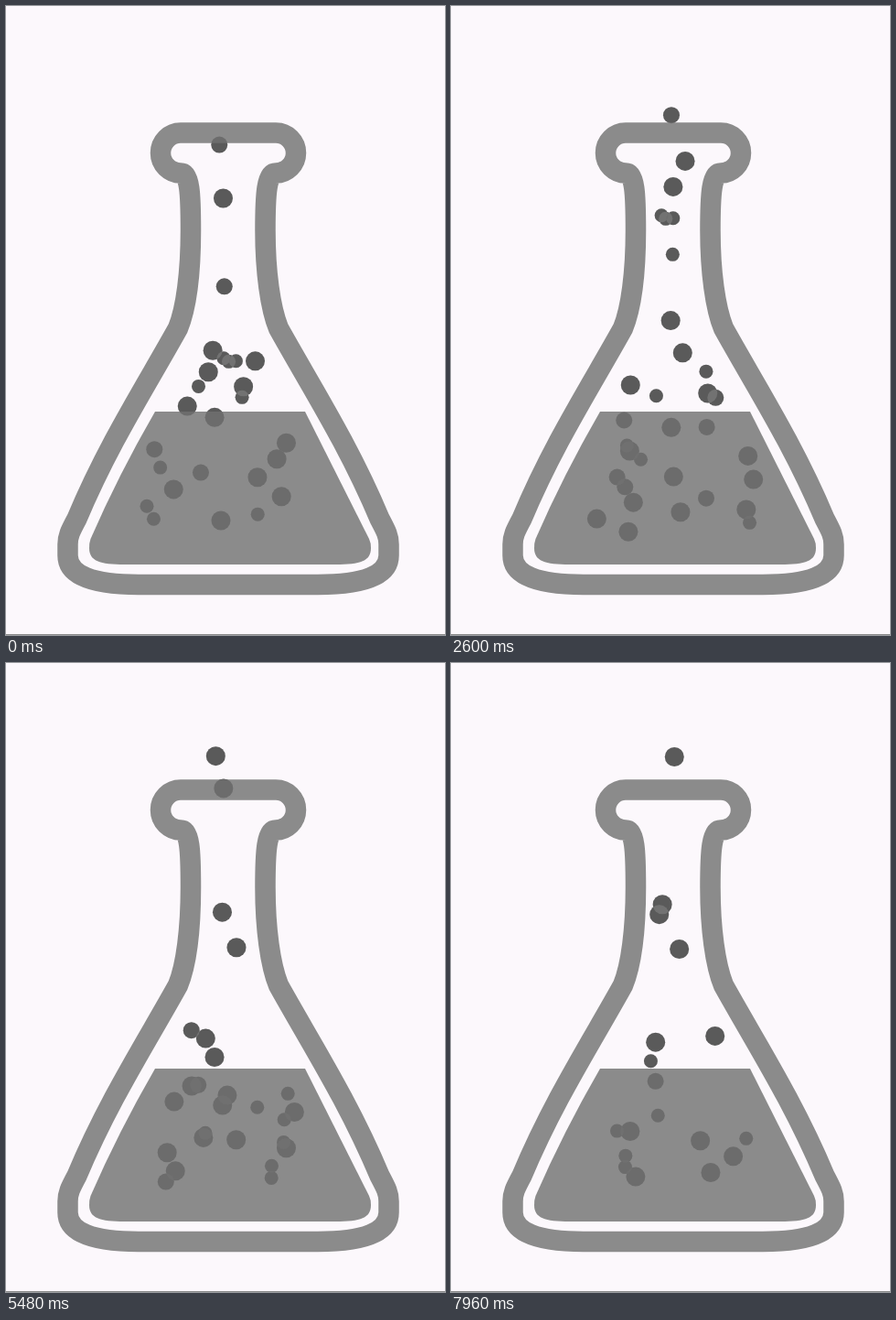
An HTML page with a canvas for the animation above (8000 ms loop, 480 by 687 pixels).

```html
<!DOCTYPE html>
<html lang="en">
<head>
<meta charset="utf-8">
<title>Bubbling flask</title>
<style>
  html, body { margin: 0; width: 100%; height: 100%; overflow: hidden; background: #fcf8fc; }
  canvas { display: block; }
</style>
</head>
<body>
<canvas id="stage" width="480" height="687"></canvas>
<script>
const ctx = document.getElementById('stage').getContext('2d');
const LOOP = 8;
const BG = '#fcf8fc', GLASS = '#8b8b8b';
const AXIS = 241.8;
const START_Y = 557, POP_Y = 68;
const SWAY = 8.7, SWAY_PERIOD = 6.2;
const SMALL = 7.5, MEDIUM = 9, BIG = 10.5;

const outline = new Path2D(`M191 138.5 H295 A22 22 0 0 1 295 182.5
  C285 182.5 283.5 205 283.5 245 C283.5 290 289 330 298 352
  C333 415 374 478 408.5 560 C416 574 418.5 579 418.5 588 V600
  C418.5 622 391 632 341 632 H145 C95 632 67.5 622 67.5 600 V588
  C67.5 579 70 574 77.5 560 C112 478 153 415 188 352
  C197 330 202 290 202 245 C202 205 201 182.5 191 182.5
  A22 22 0 0 1 191 138.5 Z`);

const liquid = new Path2D(`M163 443 H327 L397 582 Q399 586 399 592
  C399 606 388 610 360 610 H130 C102 610 91 606 91 592 Q91 586 92.5 582
  Q123 512 163 443 Z`);

let seed = 11;
function random(min = 0, max = 1) {
  seed = (seed * 16807) % 2147483647;
  return min + (max - min) * seed / 2147483647;
}

const bubbles = [];
function addBubble(r, t0, x) {
  bubbles.push({ r, t0, x, birthY: random(560, 583) });
}

// Central bubbles that get through the neck: seconds at START_Y, lane x
for (const [t0, x] of [[-2.87, 236], [-2.82, 249], [-2.81, 241], [-2.16, 251]]) {
  addBubble(SMALL, t0, x);
}
for (const [t0, x] of [[-5.63, 238], [-3.48, 242]]) addBubble(MEDIUM, t0, x);
for (const [t0, x] of [
  [-4.13, 245], [-1.68, 251], [0.06, 235.5], [0.48, 246], [1.45, 232.8],
  [2.09, 239], [2.55, 250.5], [4.47, 234.5], [4.6, 230], [5.05, 248]
]) addBubble(BIG, t0, x);

// Outer bubbles, stopped by the narrowing glass
const OUTER = 98, FIRST = -2.4, LAST = 8.2;
for (let i = 0; i < OUTER; i++) {
  const side = i % 2 ? 1 : -1;
  const t0 = FIRST + (LAST - FIRST) * (i + random()) / OUTER;
  const pick = random();
  const r = pick < 0.35 ? SMALL : pick < 0.5 ? MEDIUM : BIG;
  addBubble(r, t0, AXIS + side * random(22, 92));
}

function insideFlask(x, y) {
  const half = 15.6 + 0.42 * Math.max(0, y - 330);
  return Math.abs(x - AXIS) < half;
}

function disc(x, y, r) {
  ctx.beginPath();
  ctx.arc(x, y, r, 0, 2 * Math.PI);
  ctx.fill();
}

// Darkens what is light and slightly lightens what is dark
function drawBubble(x, y, r) {
  ctx.globalCompositeOperation = 'exclusion';
  ctx.fillStyle = 'rgb(151, 151, 151)';
  disc(x, y, r);
  ctx.globalCompositeOperation = 'source-over';
  ctx.fillStyle = 'rgba(0, 0, 0, 0.14)';
  disc(x, y, r);
}

function draw(t) {
  ctx.fillStyle = BG;
  ctx.fillRect(0, 0, 480, 687);
  ctx.fillStyle = GLASS;
  ctx.fill(liquid);
  ctx.fillRect(0, 686, 480, 1);
  ctx.strokeStyle = GLASS;
  ctx.lineWidth = 22.5;
  ctx.stroke(outline);

  for (const b of bubbles) {
    const age = t - b.t0;
    const y = START_Y - 8 * b.r * age; // larger bubbles rise faster
    if (y > b.birthY || y < POP_Y) continue;
    const x = b.x + SWAY * Math.sin(2 * Math.PI * age / SWAY_PERIOD);
    if (insideFlask(x, y)) drawBubble(x, y, b.r);
  }
}

function frame(now) {
  draw(now / 1000 % LOOP);
  requestAnimationFrame(frame);
}
requestAnimationFrame(frame);
</script>
</body>
</html>
```
